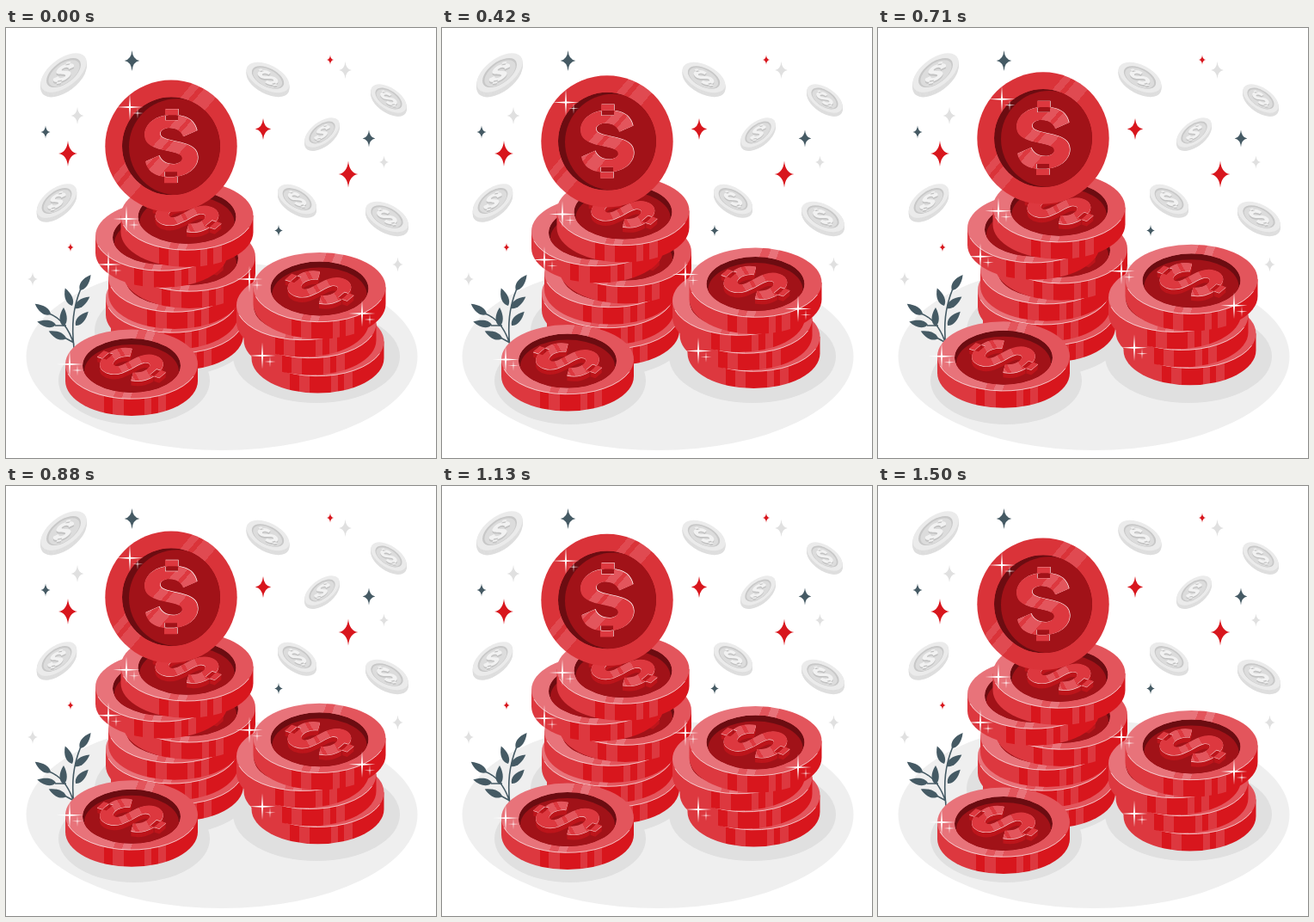
Recreate the animation shown at these times as an HTML page. Size 500 by 500 pixels, loop 1.54 s.

```html
<!DOCTYPE html>
<html lang="en">
<head>
<meta charset="utf-8">
<title>Coins</title>
<style>
html, body { margin: 0; height: 100%; overflow: hidden; background: #fff; }
svg { display: block; width: 100vw; height: 100vh; }
</style>
</head>
<body>
<svg id="stage" viewBox="0 0 500 500"></svg>
<script>
const SLATE = '#455a64', RED = '#d8161d', MID = '#dd383f', LIGHT = '#e3555c', PINK = '#e8737a';
const PIT = '#6c0c11', FLOOR = '#a11218', SQUASH = .53;
const lying = `scale(1 ${SQUASH}) rotate(-58)`;

const group = (transform, content) => `<g transform="${transform}">${content}</g>`;
const at = (x, y, content) => group(`translate(${x} ${y})`, content);
const ellipse = (x, y, rx, ry, fill) => `<ellipse cx="${x}" cy="${y}" rx="${rx}" ry="${ry}" fill="${fill}"/>`;
const disc = (r, fill, x = 0, y = 0) => ellipse(x, y, r, r, fill);
const dollar = (fill, transform = '') => `<use href="#dollar" fill="${fill}" transform="${transform}"/>`;
const repeat = (count, draw) => Array.from({ length: count }, (_, i) => draw(i)).join('');
const each = (list, draw) => list.map(draw).join('');

// Hard stripes: two colours take turns, changing at each edge.
function stripes(id, x, y, colors, edges) {
  const stops = [0, ...edges].map((from, i) =>
    `<stop offset="${from}" stop-color="${colors[i % 2]}"/><stop offset="${edges[i] ?? 1}" stop-color="${colors[i % 2]}"/>`);
  return `<linearGradient id="${id}" gradientUnits="userSpaceOnUse" x1="${-x}" y1="${-y}" x2="${x}" y2="${y}">${stops.join('')}</linearGradient>`;
}

const halfS = 'C26-36 8-36 0-36C-18-36-31-26-31-13C-31 6 0 4 10 10C16 14 12 21 2 21C-6 21-12 17-14 11';
const flip = path => path.replace(/-?\d+/g, n => ' ' + -n);
const defs = `<defs>
  <path id="dollar" d="M30-18${halfS}L-30 18${flip(halfS)}ZM-7-43H8V-30H-7ZM-8 30H7V43H-8Z"/>
  <clipPath id="pit"><ellipse cy="1.5" rx="57" ry="31.5"/></clipPath>
  <clipPath id="hole"><circle r="57"/></clipPath>
  ${stripes('side', 77, 0, [MID, RED], [.29, .36, .44, .6, .65, .7, .76])}
  ${stripes('rim', 74, 28, [PINK, LIGHT], [.46, .52, .58])}
  ${stripes('shine', 54, 46, ['#da3339', '#e04a51'], [.3, .36, .4, .52])}
  ${stripes('ink', 30, 26, [MID, LIGHT], [.3, .42, .48, .66])}
</defs>`;

const flatCoin = (x, y) => at(x, y, `
  <path fill="url(#side)" d="M-77 0V19.5A77 40.5 0 0 0 77 19.5V0Z"/>
  ${ellipse(0, 0, 77, 40.5, 'url(#rim)')}
  <path fill="none" stroke="#fff" stroke-width=".8" stroke-opacity=".8" d="M-74 11A77 40.5 0 0 0 72 14"/>
  <g clip-path="url(#pit)">${ellipse(0, 1.5, 57, 31.5, PIT)}${ellipse(0, 8, 55, 31, FLOOR)}</g>
  ${repeat(6, i => dollar('#bd151b', `translate(0 ${6 - i}) ${lying}`))}
  ${dollar('#f6cfd1', `translate(0 .6) ${lying}`)}${dollar('url(#ink)', lying)}`);

const standingCoin = (x, y) => at(x, y, `
  ${disc(76.7, 'url(#shine)')}
  <g clip-path="url(#hole)">${disc(57, PIT)}${disc(56, FLOOR, 7, 1)}</g>
  ${dollar('#fff', 'translate(.6 -.4)')}${dollar('url(#ink)')}`);

function greyCoin(x, y, size, tilt, turn) {
  const place = (drop, content) => group(`translate(0 ${drop}) rotate(${tilt}) scale(1 ${SQUASH})`, content);
  const mark = `rotate(${turn}) scale(${size / 77})`;
  return at(x, y, `
    ${repeat(6, i => place((6 - i) * size * .03, disc(size, '#dedede')))}
    ${place(0, disc(size, '#ebebeb') + disc(size * .75, '#c8c8c8') + disc(size * .68, '#dcdcdc', 0, size * .05))}
    ${place(size * .06, dollar('#c2c2c2', mark))}${place(0, dollar('#f2f2f2', mark))}`);
}

// Coins in a stack rise evenly; only their sideways place varies.
const stack = (xs, y, spacing) => each(xs, (x, i) => flatCoin(x, y - i * spacing));

const star = (color, points) => each(points, ([x, y, size]) =>
  group(`translate(${x} ${y}) scale(${size / 15})`,
    `<path fill="${color}" d="M0-15Q1.2-1.6 11 0Q1.2 1.6 0 15Q-1.2 1.6-11 0Q-1.2-1.6 0-15Z"/>`));

const ray = (x, y, r) => group(`translate(${x} ${y}) scale(${r / 16})`,
  '<path fill="#fff" d="M0-16L1-1L16 0L1 1L0 16L-1 1L-16 0L-1-1Z"/>');
const glint = ([x, y]) => ray(x, y, 15.5) + ray(x + 9, y + 7, 6.5);

const leaf = ([x, y, angle]) => group(`translate(${x} ${y}) rotate(${angle})`,
  `<path fill="${SLATE}" d="M0 0C4-6 13-6 22 0C13 5 4 5 0 0Z"/>`);

const leftLeaning = [[67, 52, 31], [367.5, 121.5, 23.5], [59, 201, 27]];
const rightLeaning = [[304.5, 57.5, 27], [445, 82, 23.5], [338.5, 199, 25], [443, 219.5, 27]];
const leaves = [
  [86, 305, -55], [80, 326, -38], [81, 346, -48], [77, 323, -112],
  [67, 347, -90], [52, 333, -146], [58, 345, -171], [70, 361, -157]
];
const glints = [[144, 92], [140, 222], [119, 275], [283, 292], [414, 332], [298, 381], [74, 391]];

document.getElementById('stage').innerHTML = `${defs}
  ${ellipse(251, 382, 227.5, 109, '#efefef')}
  ${ellipse(195, 352, 92, 53, '#e0e0e0')}
  ${ellipse(361, 382, 97, 54, '#e0e0e0')}
  ${ellipse(149, 410, 88, 51, '#e0e0e0')}
  ${each(leftLeaning, ([x, y, size]) => greyCoin(x, y, size, -37, 45))}
  ${each(rightLeaning, ([x, y, size]) => greyCoin(x, y, size, 76 - size * 1.8, -58))}
  ${star(SLATE, [[146.5, 38, 12], [46, 121, 7.5], [422, 128.5, 10], [317, 235.5, 6.5]])}
  ${star(RED, [[72, 146, 15], [75, 255, 5], [299, 117.5, 12.5], [377, 37, 5.5], [398, 170, 15.5]])}
  ${star('#e0e0e0', [[83, 102, 10], [394.5, 49, 10], [455.5, 275, 8.5], [31, 292, 8], [439.5, 156, 7.5]])}
  ${each(leaves, leaf)}
  <path fill="none" stroke="${SLATE}" stroke-width="1.6" d="M79 372C76 345 78 325 87 303M79 368C74 352 66 338 50 332M70 346H57M79 366L68 360"/>
  <g id="coins">
    ${stack([199, 193, 196, 213, 181, 210.5], 338, 24)}
    ${standingCoin(192, 137.3)}
    ${stack([362.5, 353.5, 345, 364.5], 364.5, 21)}
    ${flatCoin(146, 391)}
    ${each(glints, glint)}
  </g>`;

const coins = document.getElementById('coins');
const LOOP = 1540, HALF = 18, LIFT = 9.8;

// The coins rise and sink at an even pace, 24 steps a second.
function draw(time) {
  const step = Math.min(2 * HALF, Math.floor((time % LOOP + 5) * .024));
  const rise = LIFT * (1 - Math.abs(step / HALF - 1));
  coins.setAttribute('transform', `translate(0 ${-rise})`);
}
const start = performance.now();
function tick() {
  draw(performance.now() - start);
  requestAnimationFrame(tick);
}
tick();
</script>
</body>
</html>
```
